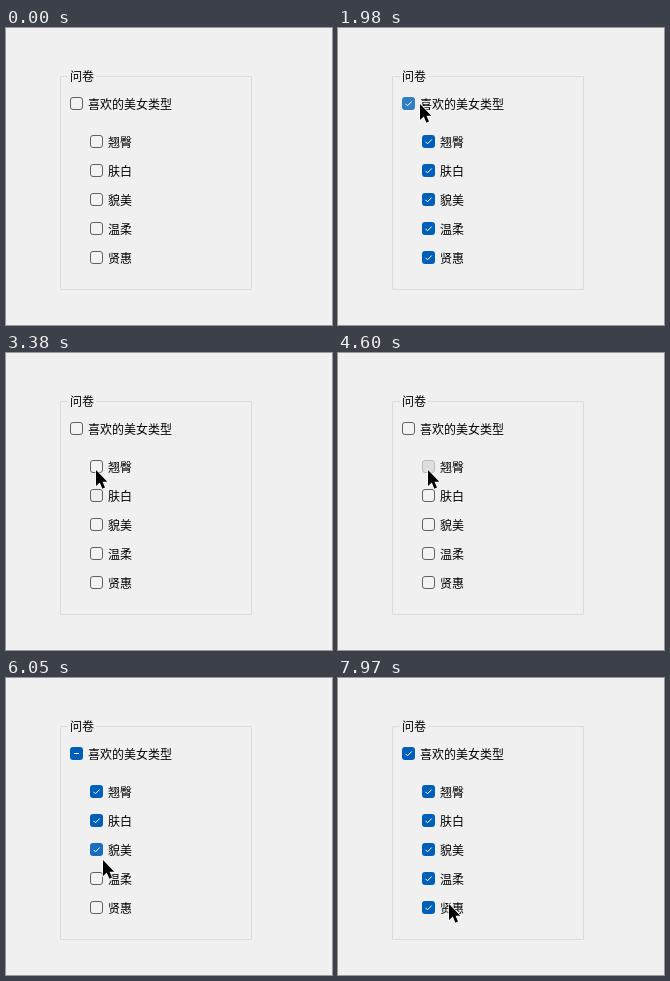
Animation, 326 px wide and 297 px high, one loop 8000 ms. Source, as an HTML page:

```html
<!DOCTYPE html>
<html lang="zh-CN">
<head>
<meta charset="utf-8">
<style>
  html, body { margin: 0; width: 100%; height: 100%; overflow: hidden; background: #f0f0f0; }
  svg { display: block; }
  text { font: 12px "Noto Sans CJK SC", "Noto Sans CJK", sans-serif; fill: #000; }
  .icon { fill: none; stroke: #fff; stroke-width: 1; }
</style>
</head>
<body>
<svg id="stage" width="326" height="297" viewBox="0 0 326 297">
  <path d="M62 48.5H54.5V261.5H245.5V48.5H90" fill="none" stroke="#dcdcdc"/>
  <text x="64" y="53">问卷</text>
  <g id="boxes"></g>
  <path id="cursor" d="M0 0V16L3.8 12.6L6.4 18.7L9 17.6L6.5 11.7H11.3Z"
        stroke="#fff" stroke-width="1.4" paint-order="stroke"/>
</svg>
<script>
const LOOP = 8000, TICK = 46.87;
const labels = ['喜欢的美女类型', '翘臀', '肤白', '貌美', '温柔', '贤惠'];
const cursor = document.getElementById('cursor');

// Pointer path: [tick, x, y]
const path = [
  [4, 168, 242], [10, 84, 80], [13, 84, 80], [15, 82, 76], [68, 82, 76],
  [70, 89, 124], [71, 90, 136], [72, 90, 117], [103, 90, 117], [109, 92, 146],
  [113, 92, 146], [114, 94, 150], [118, 94, 150], [122, 96, 178], [127, 96, 178],
  [129, 97, 182], [130, 97, 182], [133, 97, 196], [142, 97, 196], [145, 97, 213],
  [147, 97, 213], [151, 97, 230], [162, 97, 230], [166, 281, 123], [170, 111, 226]
];

// Clicks: [box, press tick, release tick, tick when the fade is over]
const clicks = [
  [0, 19, 20, 21], [0, 42, 44, 47], [0, 54, 54, 55], [0, 62, 64, 66],
  [1, 74, 76, 79], [1, 89, 90, 92], [1, 98, 99, 101], [2, 114, 116, 118],
  [3, 124, 126, 128], [4, 136, 137, 139], [5, 153, 155, 157]
];

function add(parent, tag, attrs) {
  const el = document.createElementNS('http://www.w3.org/2000/svg', tag);
  for (const name in attrs) el.setAttribute(name, attrs[name]);
  return parent.appendChild(el);
}

const boxes = labels.map((label, i) => {
  const x = i ? 84 : 64, y = i ? 78 + 29 * i : 69;
  const g = add(document.getElementById('boxes'), 'g', { transform: `translate(${x} ${y})` });
  const base = add(g, 'rect', { x: .5, y: .5, width: 12, height: 12, rx: 2.5 });
  const fill = add(g, 'rect', { width: 13, height: 13, rx: 3 });
  const check = add(g, 'path', { d: 'M3.5 6.8L5.5 8.8L9.7 4.5', class: 'icon' });
  const dash = add(g, 'path', { d: 'M4 6.5H9', class: 'icon' });
  add(g, 'text', { x: 18, y: 12 }).textContent = label;
  return { x, y, width: 18 + 12 * label.length, base, fill, check, dash };
});

function pointerAt(tick) {
  const next = path.findIndex(p => p[0] >= tick);
  const b = path[next < 0 ? path.length - 1 : next], a = path[Math.max(next - 1, 0)];
  const u = b[0] > a[0] ? Math.min((tick - a[0]) / (b[0] - a[0]), 1) : 0;
  return [1, 2].map(n => Math.round(a[n] + (b[n] - a[n]) * u));
}

// 0 = empty, 1 = checked, 2 = partly checked
function withParent(kids) {
  const count = kids.reduce((sum, v) => sum + v, 0);
  return [count === 0 ? 0 : count === kids.length ? 1 : 2, ...kids];
}

function statesAt(tick) {
  let kids = [0, 0, 0, 0, 0], before = withParent(kids), after = before, mix = 1, pressed = -1;
  for (const [box, press, release, done] of clicks) {
    if (tick < press) break;
    if (tick < release) { pressed = box; break; }
    kids = kids.map((v, i) => box === 0 ? +(after[0] !== 1) : i === box - 1 ? 1 - v : v);
    before = after;
    after = withParent(kids);
    mix = Math.min((tick - release + 1) / (done - release + 1), 1);
  }
  return { before, after, mix, pressed };
}

function draw(ms) {
  const tick = Math.floor((ms + 2) / TICK);
  const { before, after, mix, pressed } = statesAt(tick);
  const [px, py] = pointerAt(tick), [hx, hy] = pointerAt(tick - 1);

  boxes.forEach((box, i) => {
    const hover = tick > 4 && hx >= box.x && hx < box.x + box.width && hy >= box.y - 4 && hy < box.y + 18;
    const down = i === pressed;
    const amount = test => (test(before[i]) ? 1 - mix : 0) + (test(after[i]) ? mix : 0);
    box.base.setAttribute('fill', down ? '#dedede' : hover ? '#eeeeee' : '#f3f3f3');
    box.base.setAttribute('stroke', down ? '#bbbbbb' : '#626262');
    box.base.setAttribute('stroke-opacity', 1 - amount(v => v > 0));
    box.fill.setAttribute('fill', down ? '#327ec5' : hover ? '#196ebf' : '#005fb8');
    box.fill.setAttribute('opacity', amount(v => v > 0));
    box.check.setAttribute('opacity', amount(v => v === 1));
    box.dash.setAttribute('opacity', amount(v => v === 2));
  });

  cursor.setAttribute('visibility', tick < 4 ? 'hidden' : 'visible');
  cursor.setAttribute('transform', `translate(${px} ${py})`);
}

const start = performance.now();
function frame() {
  draw((performance.now() - start) % LOOP);
  requestAnimationFrame(frame);
}
frame();
</script>
</body>
</html>
```
